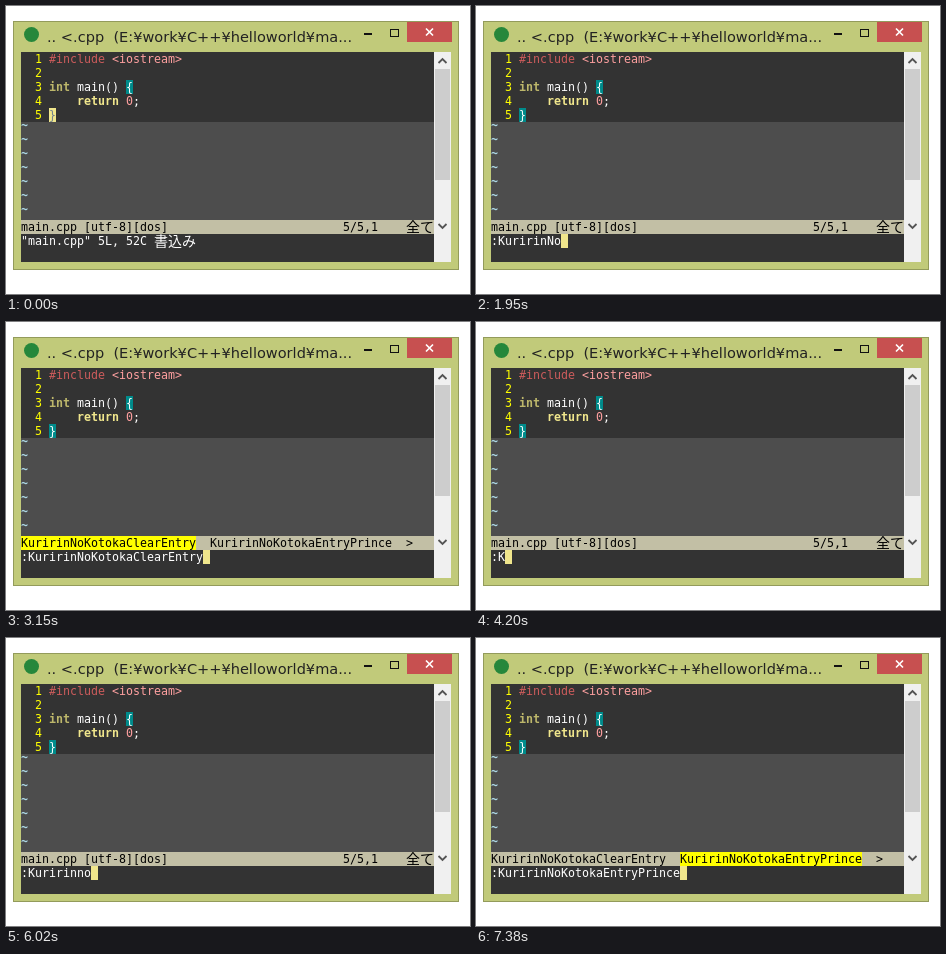
An HTML page for the animation above (8000 ms loop, 464 px wide and 288 px high).

```html
<!DOCTYPE html>
<html lang="ja">
<head>
<meta charset="utf-8">
<title>Command-line completion</title>
<style>
html, body { margin: 0; width: 100%; height: 100%; overflow: hidden; background: #fff; }
svg { display: block; }
rect { shape-rendering: crispEdges; }
text { white-space: pre; }
.cell { font: 11.63px "DejaVu Sans Mono", monospace; }
.wide { font: 14px "Noto Sans CJK JP", "Noto Sans CJK", sans-serif; }
.bold { font-weight: bold; }
.title { font: 14.55px "DejaVu Sans", sans-serif; }
</style>
</head>
<body>
<svg id="stage" width="464" height="288" viewBox="0 0 464 288"></svg>
<script>
const LOOP = 8000, LEFT = 15, TOP = 46, CELL_W = 7, CELL_H = 14;
const STATUS_ROW = 12, CMD_ROW = 13;
const KHAKI = "#f0e68c", TEAL = "#008b8b", TAN = "#c2bfa5", WHITE = "#fff", BLACK = "#000";
const stage = document.getElementById("stage");

function add(parent, tag, attrs, content = "") {
  const node = document.createElementNS("http://www.w3.org/2000/svg", tag);
  for (const key in attrs) node.setAttribute(key, attrs[key]);
  node.textContent = content;
  parent.appendChild(node);
  return node;
}
const colX = col => LEFT + col * CELL_W;
const rowY = row => TOP + row * CELL_H;
const rect = (parent, x, y, width, height, fill) => add(parent, "rect", { x, y, width, height, fill });
const cells = (parent, col, row, count, fill) =>
  rect(parent, colX(col), rowY(row), count * CELL_W, CELL_H, fill);
const put = (parent, col, row, content, fill, style = "", lift = 0) =>
  add(parent, "text", { x: colX(col), y: rowY(row) + 11 - lift, fill, class: "cell " + style }, content);
const putWide = (parent, col, row, content, fill) =>
  add(parent, "text", { x: colX(col), y: rowY(row) + 11.5, fill, class: "wide" }, content);
const line = (d, stroke, width) =>
  add(stage, "path", { d, stroke, "stroke-width": width, fill: "none" });
const show = (node, visible) => node.setAttribute("visibility", visible ? "visible" : "hidden");

function drawWindow() {
  rect(stage, 0, 0, 464, 288, WHITE);
  rect(stage, 7, 15, 446, 249, "#939b5b");
  rect(stage, 8, 16, 444, 247, "#c1ca7a");
  add(stage, "circle", { cx: 25.5, cy: 28.5, r: 7.5, fill: "#26873b" });
  add(stage, "text", { x: 41, y: 36, fill: "#222", class: "title" },
    ".. <.cpp  (E:¥work¥C++¥helloworld¥ma...");
  rect(stage, 358, 27, 8, 2, "#111");
  line("M384 23.5H393M384.5 23V31M392.5 23V31M384 30.5H393", "#111", 1);
  rect(stage, 401, 16, 45, 20, "#c75050");
  line("M420 22.5L427 29.5M427 22.5L420 29.5", WHITE, 1.7);

  rect(stage, LEFT, TOP, 413, 210, "#333");
  rect(stage, LEFT, rowY(5), 413, 98, "#4d4d4d");
  rect(stage, 428, TOP, 17, 210, "#f0f0f0");
  rect(stage, 429, 63, 15, 111, "#cdcdcd");
  line("M432.5 57L436.5 53L440.5 57M432.5 218L436.5 222L440.5 218", "#555", 1.8);
}

function drawCode() {
  for (let row = 0; row < 5; row++) put(stage, 2, row, row + 1, "#ff0");
  for (let row = 5; row < 12; row++) put(stage, 0, row, "~", "#add8e6", "bold", 4);
  put(stage, 4, 0, "#include", "#cd5c5c");
  put(stage, 13, 0, "<iostream>", "#ffa0a0");
  put(stage, 4, 2, "int", "#bdb76b", "bold");
  put(stage, 8, 2, "main()", WHITE);
  cells(stage, 15, 2, 1, TEAL);
  put(stage, 15, 2, "{", WHITE);
  put(stage, 8, 3, "return", KHAKI, "bold");
  put(stage, 15, 3, "0", "#ffa0a0");
  put(stage, 16, 3, ";", WHITE);
}

const CLEAR = "KuririnNoKotokaClearEntry", PRINCE = "KuririnNoKotokaEntryPrince";

// Each step: start time, command line (null = write message), cursor place, selected menu entry
const STEPS = [
  [0, null, "edit"], [370, null, ""], [650, null, "edit"],
  [930, ":", "cmd"], [1050, ":Ku", "cmd"],
  [1200, ":Kuri", "cmd"], [1320, ":Kurir", "cmd"], [1440, ":Kuriri", "cmd"], [1560, ":Kuririn", "cmd"],
  [1820, ":KuririnN", "cmd"], [1950, ":KuririnNo", "cmd"],
  [2220, ":" + CLEAR, "cmd", 1], [2880, ":" + CLEAR, "", 1], [3150, ":" + CLEAR, "cmd", 1],
  [3400, ":" + CLEAR, "edit"],
  [4200, ":K", "cmd"], [4450, ":Ku", "cmd"],
  [4590, ":Kuri", "cmd"], [4710, ":Kuriri", "cmd"], [4830, ":Kuririn", "cmd"],
  [5500, ":Kuririn", ""], [5780, ":Kuririn", "cmd"],
  [5900, ":Kuririnn", "cmd"], [6020, ":Kuririnno", "cmd"],
  [6410, ":Kuririnn", "cmd"], [6530, ":Kuririn", "cmd"],
  [6650, ":KuririnN", "cmd"], [6800, ":KuririnNo", "cmd"],
  [6950, ":" + CLEAR, "cmd", 1], [7380, ":" + PRINCE, "cmd", 2],
];

drawWindow();
drawCode();

const brace = cells(stage, 4, 4, 1, TEAL);
const braceText = put(stage, 4, 4, "}", WHITE);

cells(stage, 0, STATUS_ROW, 59, TAN);
const status = add(stage, "g", {});
put(status, 0, STATUS_ROW, "main.cpp [utf-8][dos]", BLACK);
put(status, 46, STATUS_ROW, "5/5,1", BLACK);
putWide(status, 55, STATUS_ROW, "全て", BLACK);

const menu = add(stage, "g", {});
const choice = cells(menu, 0, STATUS_ROW, 1, "#ff0");
put(menu, 0, STATUS_ROW, CLEAR, BLACK);
put(menu, 27, STATUS_ROW, PRINCE, BLACK);
put(menu, 55, STATUS_ROW, ">", BLACK);

const message = add(stage, "g", {});
put(message, 0, CMD_ROW, '"main.cpp" 5L, 52C', WHITE);
putWide(message, 19, CMD_ROW, "書込み", WHITE);

const command = put(stage, 0, CMD_ROW, "", WHITE);
const caret = cells(stage, 0, CMD_ROW, 1, KHAKI);

function render(time) {
  const [, text, cursor, selected] = STEPS.findLast(step => step[0] <= time);
  const editing = cursor === "edit";
  brace.setAttribute("fill", editing ? KHAKI : TEAL);
  braceText.setAttribute("fill", editing ? "#708090" : WHITE);
  show(message, text === null);
  command.textContent = text ?? "";
  show(caret, cursor === "cmd");
  caret.setAttribute("x", colX((text ?? "").length));
  show(status, !selected);
  show(menu, selected);
  if (selected) {
    choice.setAttribute("x", colX(selected === 1 ? 0 : 27));
    choice.setAttribute("width", (selected === 1 ? CLEAR : PRINCE).length * CELL_W);
  }
}

const start = performance.now();
function tick() {
  render((performance.now() - start) % LOOP);
  requestAnimationFrame(tick);
}
tick();
</script>
</body>
</html>
```
